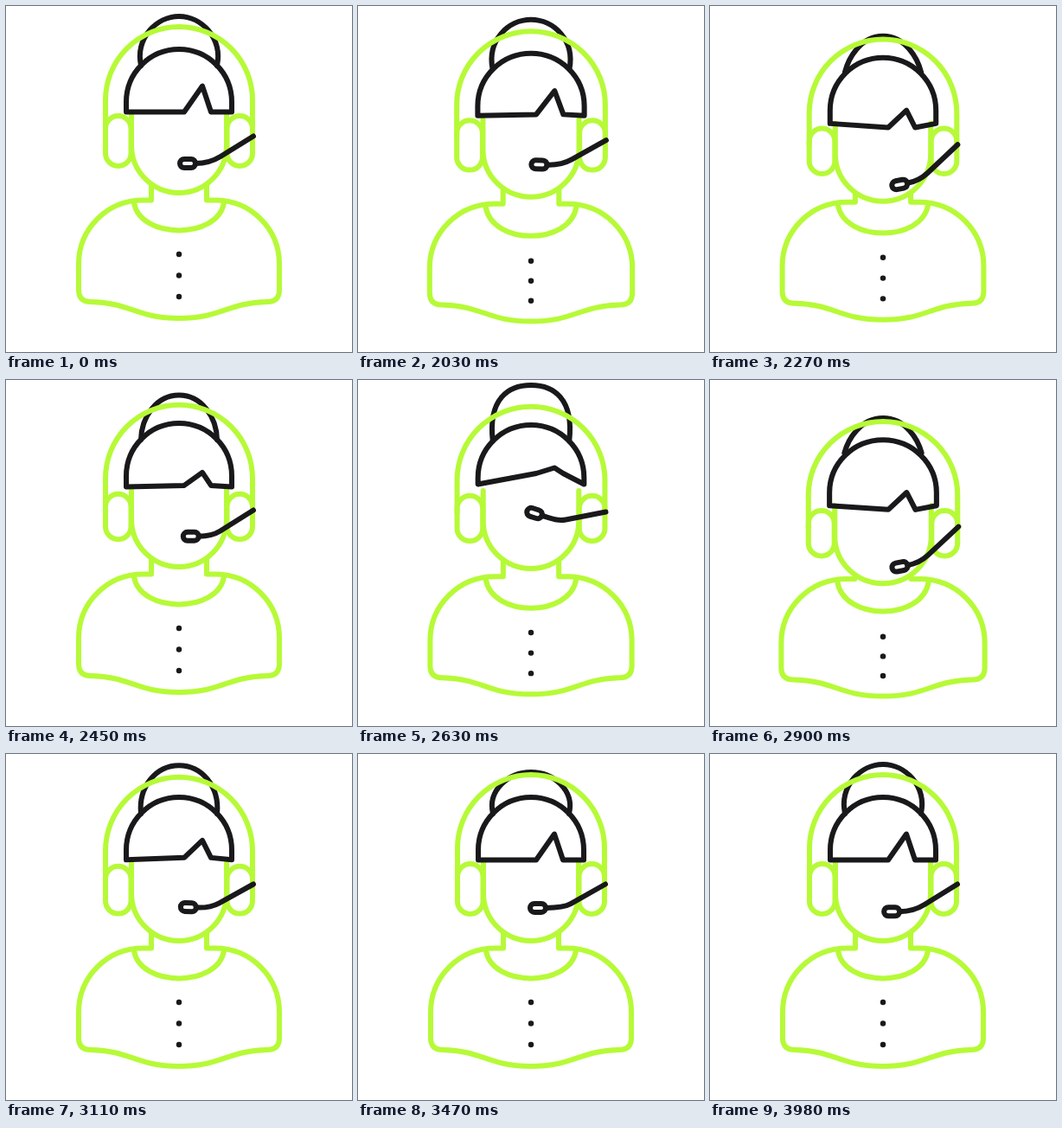
Recreate the animation shown at these times as an HTML page. Size 400 by 400 pixels, loop 4010 ms.

```html
<!DOCTYPE html>
<html lang="en">
<head>
<meta charset="utf-8">
<title>Support agent</title>
<style>
  html, body { margin: 0; width: 100%; height: 100%; overflow: hidden; background: #fff; }
  svg { display: block; width: 100vw; height: 100vh; }
  path, rect { fill: none; stroke-width: 6; stroke-linecap: round; stroke-linejoin: round; }
  .green { stroke: #b6fa37; }
  .dark { stroke: #19181a; }
  circle { fill: #19181a; }
</style>
</head>
<body>
<svg viewBox="0 0 400 400">
  <g id="figure">
    <path id="bun" class="dark"/>
    <path id="body" class="green"/>
    <path id="collar" class="green"/>
    <path id="face" class="green"/>
    <path id="band" class="green"/>
    <rect id="earL" class="green" x="115" width="29.5" rx="14.75"/>
    <rect id="earR" class="green" x="255.5" width="29.5" rx="14.75"/>
    <path id="hair" class="dark"/>
    <path id="arm" class="dark"/>
    <rect id="mic" class="dark" x="-9" y="-5" width="18" height="10" rx="5"/>
    <circle id="dot0" cx="200" r="3.2"/>
    <circle id="dot1" cx="200" r="3.2"/>
    <circle id="dot2" cx="200" r="3.2"/>
  </g>
</svg>
<script>
const LOOP = 4010, START = 2030, STEP = 30;
const NODS = [{ start: 1980, span: 365 }, { start: 2590, span: 455 }];

const progress = (t, from, to) => Math.min(1, Math.max(0, (t - from) / (to - from)));
const ease = (t, from, to) => {
  const p = progress(t, from, to);
  return p * p * (3 - 2 * p);
};
const arch = p => Math.sin(Math.PI * p);

// 0 at rest, 1 at the bottom of each nod
const dip = (t, length) => NODS.reduce(
  (sum, n) => sum + arch(progress(t, n.start, n.start + n.span * length)), 0);

function motion(t) {
  // How far hair and headset have come loose, and the sway they trail with
  const loose = ease(t, 1990, 2180) - ease(t, 3000, 3250);
  const sway = loose * Math.cos(2 * Math.PI * (t - 2315) / 630);
  // The microphone rings on after the second nod, the bun bounces once
  const late = Math.max(0, t - 3370);
  const ring = -5 * Math.sin(2 * Math.PI * late / 400) * Math.exp(-late / 500);
  const bounce = 9 * arch(progress(t, 3250, 3690)) ** 2;
  return { head: 27 * dip(t, 1) ** 2, torso: dip(t, 0.86), loose, sway, ring, bounce };
}

const el = {};
document.querySelectorAll('[id]').forEach(e => el[e.id] = e);
const set = (id, attrs) => {
  for (const k in attrs) el[id].setAttribute(k, attrs[k]);
};
const draw = (id, d) => set(id, { d });

function halfBody(x, top, hem, chin) {
  const neck = Math.min(chin - 8, top);
  return `M${x(168)} ${neck}V${top}H${x(158)}
    C${x(117)} ${top} ${x(84)} ${top + 33} ${x(84)} ${top + 74}
    V${328 + hem}Q${x(84)} ${342 + hem} ${x(98)} ${342 + hem}
    C${x(145)} ${343 + hem} ${x(150)} ${361 + hem} 200 ${361 + hem}`;
}

function drawTorso({ head, torso }) {
  const top = 224.5 + 9 * torso, chin = 216 + head, hem = 7.5 * torso;
  draw('body', halfBody(x => x, top, hem, chin) + halfBody(x => 400 - x, top, hem, chin));
  const rim = top + 3, dip = 270 + 15 * torso;
  draw('collar', `M148 ${rim}C155 ${dip} 245 ${dip} 252 ${rim}`);
  for (let i = 0; i < 3; i++) {
    set('dot' + i, { cy: 287 + 24.5 * i + (16 - 3 * i) * torso });
  }
}

function drawHead({ head, loose, sway, bounce }) {
  draw('face', `M145 ${126 + head}V${161 + head}A55 55 0 0 0 255 ${161 + head}V${126 + head}`);

  const band = head + 4.8 * loose, pad = 127 + band;
  draw('band', `M115 ${pad + 20}V${109 + band}A85 85 0 0 1 285 ${109 + band}V${pad + 20}`);
  for (const id of ['earL', 'earR']) set(id, { y: pad, height: 58 - 5.5 * loose });

  const base = 122.5 + head, corner = base + 4 * sway;
  const low = base + 13 * sway - 3.5 * loose;
  const notch = 92.5 + head + 6 * sway + 13 * loose;
  draw('hair', `M139 ${corner}V${111 + head}A61 61 0 0 1 261 ${111 + head}V${corner}
    L237 ${low}L227 ${notch}L206 ${low}Z`);

  const foot = 69 + head * 0.8, tip = 12 + head + 11 * sway + 3 * loose + bounce;
  const side = foot - (foot - tip) * (0.56 - 0.2 * sway);
  const bulge = 149.5 + 6 * loose + 5 * sway;
  draw('bun', `M156 ${foot}C${bulge} ${side} 174 ${tip} 200 ${tip}
    S${400 - bulge} ${side} 244 ${foot}`);
}

function drawMic({ head, loose, sway, ring }) {
  const x = 210 + 8 * sway + 2 * loose + ring / 2;
  const y = 182 + head + 23.5 * sway - 6.5 * loose + ring;
  const tilt = 3 * loose - 15 * sway;
  const kneeX = 248 + 6 * sway - 2 * loose + ring / 2;
  const kneeY = 174 + head + 12.5 * sway - 2 * loose + ring / 5;
  const endX = 286, endY = 150.5 + head;

  const a = tilt * Math.PI / 180, dx = Math.cos(a), dy = Math.sin(a);
  draw('arm', `M${x + 9 * dx} ${y + 9 * dy}C${x + 19 * dx} ${y + 19 * dy}
    ${kneeX - (endX - kneeX) * 0.2} ${kneeY - (endY - kneeY) * 0.2}
    ${kneeX} ${kneeY}L${endX} ${endY}`);
  set('mic', { transform: `translate(${x} ${y}) rotate(${tilt})` });
}

function render(t) {
  const pose = motion(t), wide = 1 + 0.03 * pose.torso ** 1.5;
  set('figure', { transform: `translate(200 0) scale(${wide} 1) translate(-200 0)` });
  drawTorso(pose);
  drawHead(pose);
  drawMic(pose);
}

const origin = performance.now();
function tick() {
  const t = Math.max(0, performance.now() - origin) % LOOP;
  render(t < START ? 0 : START + Math.floor((t - START) / STEP) * STEP);
  requestAnimationFrame(tick);
}
tick();
</script>
</body>
</html>
```
